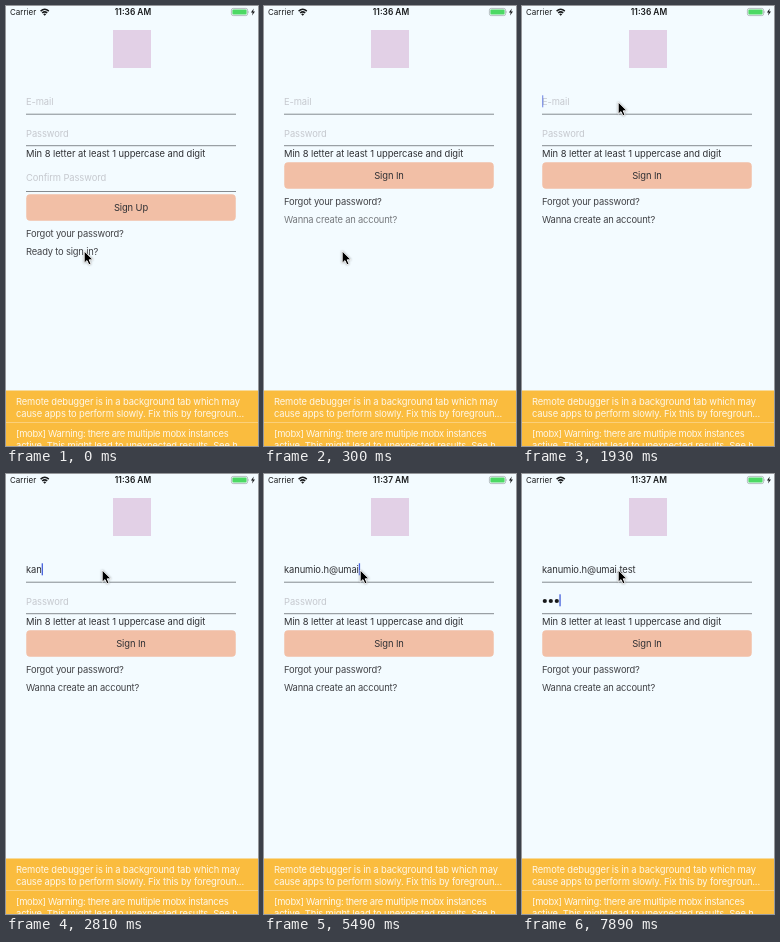
An HTML page for the animation above (8000 ms loop, 252 by 440 pixels).

```html
<!DOCTYPE html>
<html lang="en">
<head>
<meta charset="utf-8">
<title>Sign in</title>
<style>
  html, body { margin: 0; width: 100%; height: 100%; overflow: hidden; background: #f3fbff; }
  svg { display: block; width: 252px; height: 440px; }
  text { font: 9.4px Inter, "Liberation Sans", sans-serif; letter-spacing: -.1px; fill: #303135; white-space: pre; }
  .hint { fill: #c6c9cf; }
  .note { letter-spacing: -.06px; }
  .link { letter-spacing: -.19px; fill: #424347; }
  .mid { text-anchor: middle; }
  .bar { font-size: 8px; letter-spacing: 0; fill: #17191b; }
  .clock { font-size: 8.4px; font-weight: 600; }
  .toast text { letter-spacing: -.13px; fill: #fff; fill-opacity: .88; }
  .toast .tight { letter-spacing: -.27px; }
  .rule { fill: #858b90; }
  .button { fill: #f2bfa6; }
  #pointer { filter: drop-shadow(0 .6px .8px rgba(0, 0, 0, .35)); }
</style>
</head>
<body>
<svg viewBox="0 0 252 440">
  <rect width="252" height="440" fill="#f3fbff"/>

  <text class="bar" x="4" y="9">Carrier</text>
  <g fill="none" stroke="#17191b" stroke-width="1.5">
    <path d="M34.6 5.1Q38.7 1.3 42.8 5.1"/>
    <path d="M36.2 7Q38.7 4.8 41.2 7"/>
  </g>
  <path d="M37.2 8.2Q38.7 7 40.2 8.2L38.7 9.8Z" fill="#17191b"/>
  <text class="bar clock mid" id="clock" x="127" y="9">11:36 AM</text>
  <rect x="225.4" y="2.4" width="16.2" height="7.2" rx="1.8" fill="none" stroke="#9ba5a6" stroke-width=".7"/>
  <rect x="226.4" y="3.4" width="14.2" height="5.2" rx="1" fill="#4cd964"/>
  <path d="M242.4 4.7Q243.6 6 242.4 7.3Z" fill="#9ba5a6"/>
  <path d="M247.8 2.6L244.9 6.5H246.7L246 9.6L249 5.5H247.1Z" fill="#17191b"/>

  <rect x="107" y="24" width="38" height="38" fill="#e2d0e6"/>

  <text class="hint" id="mailHint" x="20" y="99.2">E-mail</text>
  <text id="mail" x="20" y="99.2"></text>
  <rect class="rule" x="20" y="107.7" width="210" height="1"/>
  <text class="hint" id="passHint" x="20" y="130.5">Password</text>
  <g id="dots" fill="#17181a">
    <circle cx="22.8" cy="127" r="2.1"/>
    <circle cx="28.8" cy="127" r="2.1"/>
    <circle cx="34.8" cy="127" r="2.1"/>
  </g>
  <rect class="rule" x="20" y="139.2" width="210" height="1"/>
  <text class="note" x="20" y="150.6">Min 8 letter at least 1 uppercase and digit</text>

  <g id="signUp">
    <text class="hint" x="20" y="175">Confirm Password</text>
    <rect class="rule" x="20" y="185" width="210" height="1"/>
  </g>
  <g id="actions">
    <rect class="button" x="20.25" y="156.25" width="209.5" height="26.5" rx="4"/>
    <text class="mid" id="submit" x="125" y="173">Sign In</text>
    <text class="link" x="20" y="199">Forgot your password?</text>
    <text class="link" id="toggle" x="20" y="217.2">Wanna create an account?</text>
  </g>

  <rect id="caret" width="1.3" height="12" fill="#4560dc"/>

  <g class="toast">
    <rect y="384.5" width="252" height="56" fill="#fabc3e"/>
    <rect y="416" width="252" height="1" fill="#fbd07a"/>
    <text x="10" y="399.2">Remote debugger is in a background tab which may</text>
    <text x="10" y="411.2">cause apps to perform slowly. Fix this by foregroun...</text>
    <text class="tight" x="10" y="431">[mobx] Warning: there are multiple mobx instances</text>
    <text x="10" y="443">active. This might lead to unexpected results. See h...</text>
  </g>

  <path id="pointer" d="M0 0V12.2L2.8 9.6L4.7 13.8L6.8 12.9L5 8.8H8.8Z"
        fill="#000" stroke="#fff" stroke-width=".9" stroke-linejoin="round"/>
</svg>
<script>
  const LOOP = 8000;
  const ADDRESS = 'kanumio.h@umai.test';
  const mailKeys = [2530, 2680, 2810, 3110, 3260, 3410, 3560, 3860, 4150, 4600,
                    4900, 5190, 5340, 5490, 5790, 5940, 6090, 6240, 6390];
  const passKeys = [7440, 7740, 7890];
  const ui = {};
  document.querySelectorAll('[id]').forEach(el => ui[el.id] = el);

  const typed = (keys, t) => keys.filter(k => t >= k).length;
  const show = (el, on) => el.setAttribute('visibility', on ? 'visible' : 'hidden');
  const place = (el, x, y) => el.setAttribute('transform', `translate(${x} ${y})`);
  const write = (el, s) => { if (el.textContent !== s) el.textContent = s; };

  function drawForm(t) {
    const signUp = t < 300;
    show(ui.signUp, signUp);
    place(ui.actions, 0, signUp ? 32 : 0);
    write(ui.submit, signUp ? 'Sign Up' : 'Sign In');
    write(ui.toggle, signUp ? 'Ready to sign in?' : 'Wanna create an account?');
    ui.toggle.setAttribute('opacity', t < 150 ? 1 : t < 300 ? .35 : t < 450 ? .7 : 1);
    write(ui.clock, t < 4600 ? '11:36 AM' : '11:37 AM');
  }

  function drawInputs(t) {
    const chars = typed(mailKeys, t), dots = typed(passKeys, t);
    write(ui.mail, ADDRESS.slice(0, chars));
    show(ui.mailHint, !chars);
    show(ui.passHint, !dots);
    [...ui.dots.children].forEach((dot, i) => show(dot, i < dots));

    const inPass = t >= 6840;
    const width = inPass ? dots * 6 - (dots ? .6 : 0)
                         : chars ? ui.mail.getComputedTextLength() : 0;
    place(ui.caret, 20 + width, inPass ? 120.3 : 89.3);
    const alpha = t < 1330 ? 0 : t < 1930 ? 1 : t < 2080 ? .6 : t < 2380 ? 0 : 1;
    ui.caret.setAttribute('opacity', alpha);
  }

  function drawPointer(t) {
    const p = Math.min(1, Math.max(0, (t - 330) / 710));
    const e = p * p * (3 - 2 * p);
    place(ui.pointer, 78.2 + 18 * e, 245 - 149 * e);
  }

  function frame() {
    const t = performance.now() % LOOP;
    drawForm(t);
    drawInputs(t);
    drawPointer(t);
    requestAnimationFrame(frame);
  }
  frame();
</script>
</body>
</html>
```
